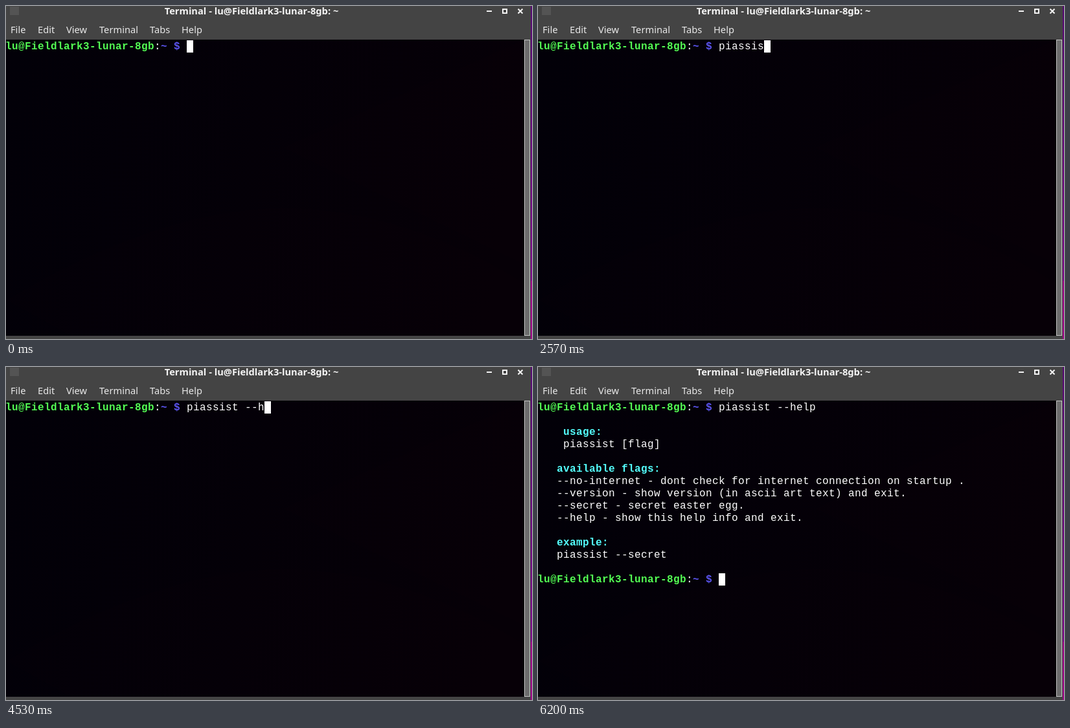
Animation, 812 px wide and 515 px high, one loop 8 s. Source, as an HTML page with a canvas:

```html
<!DOCTYPE html>
<html lang="en">
<head>
<meta charset="utf-8">
<title>Terminal</title>
<style>
html, body { margin: 0; width: 100%; height: 100%; overflow: hidden; background: #000; }
canvas { display: block; width: 812px; height: 515px; }
</style>
</head>
<body>
<canvas id="stage" width="812" height="515"></canvas>
<script>
const ctx = document.getElementById('stage').getContext('2d');
const W = 812, H = 515, LOOP = 8000;
const CELL_W = 10, CELL_H = 19, LEFT = -1, TOP = 53, ASCENT = 14;

const USER = 'lu@Fieldlark3-lunar-8gb';
const COMMAND = 'piassist --help';
const WHITE = '#ffffff', GREEN = '#54ff54', BLUE = '#5c54f0', CYAN = '#54ffff';
const UI = '14.667px "Noto Sans", sans-serif';
const MONO = '16px "Liberation Mono", monospace';

// [time, characters typed]
const TYPING = [[0, 0], [470, 1], [900, 2], [2570, 7], [2900, 8], [3730, 10],
                [4130, 11], [4530, 12], [4970, 13], [5370, 14], [5800, 15]];
const ENTER = 5800, OUTPUT = 6200;

const MENU = [['File', 7], ['Edit', 49], ['View', 93], ['Terminal', 144],
              ['Tabs', 222], ['Help', 271]];

// [row, column, text, heading]
const HELP = [
  [2, 4, 'usage:', true],
  [3, 4, 'piassist [flag]'],
  [5, 3, 'available flags:', true],
  [6, 3, '--no-internet - dont check for internet connection on startup .'],
  [7, 3, '--version - show version (in ascii art text) and exit.'],
  [8, 3, '--secret - secret easter egg.'],
  [9, 3, '--help - show this help info and exit.'],
  [11, 3, 'example:', true],
  [12, 3, 'piassist --secret'],
];

function rect(x, y, w, h, color) {
  ctx.fillStyle = color;
  ctx.fillRect(x, y, w, h);
}

function label(text, x, y, font, color) {
  ctx.font = font;
  ctx.fillStyle = color;
  ctx.fillText(text, x, y);
}

// Terminal text sits one character per cell
function print(row, col, text, color = WHITE, bold = false) {
  const font = (bold ? 'bold ' : '') + MONO;
  [...text].forEach((char, i) => {
    label(char, LEFT + (col + i) * CELL_W, TOP + row * CELL_H + ASCENT, font, color);
  });
}

function prompt(row) {
  const n = USER.length;
  print(row, 0, USER, GREEN, true);
  print(row, n, ':');
  print(row, n + 1, '~ $', BLUE, true);
  return n + 5;
}

function cursor(row, col) {
  rect(LEFT + col * CELL_W, TOP + row * CELL_H, CELL_W, CELL_H, WHITE);
}

function gradient(x0, y0, x1, y1, from, to) {
  const g = ctx.createLinearGradient(x0, y0, x1, y1);
  g.addColorStop(0, from);
  g.addColorStop(1, to);
  return g;
}

// Dark wallpaper faintly showing through the terminal
function backdrop() {
  rect(0, 52, 800, 458, gradient(0, 52, 800, 200, '#020008', '#060007'));
  ctx.fillStyle = 'rgba(50, 0, 10, 0.02)';
  ctx.beginPath();
  ctx.moveTo(800, 52);
  ctx.lineTo(427, 219);
  ctx.lineTo(800, 400);
  ctx.fill();
  ctx.beginPath();
  ctx.moveTo(0, 455);
  ctx.quadraticCurveTo(230, 316, 425, 312);
  ctx.quadraticCurveTo(610, 312, 800, 428);
  ctx.lineTo(800, 510);
  ctx.lineTo(100, 510);
  ctx.fill();
}

function chrome() {
  const grey = '#444444', light = '#f4f4f4';
  rect(0, 0, 810, 52, grey);
  rect(0, 510, 810, 5, grey);
  rect(809, 52, 1, 458, grey);
  rect(810, 0, 2, 425, gradient(0, 0, 0, 425, '#540a70', '#800a8c'));
  rect(810, 425, 2, 90, '#a00888');

  rect(800, 52, 9, 458, '#c4c4c4');
  rect(801, 53, 7, 456, '#6c6c6c');

  rect(6, 1, 14, 13, '#545454');
  rect(742, 7, 8, 2, light);
  ctx.strokeStyle = light;
  ctx.lineWidth = 2;
  ctx.strokeRect(767, 5, 6, 6);
  ctx.beginPath();
  ctx.moveTo(790.5, 4.5);
  ctx.lineTo(797.5, 11.5);
  ctx.moveTo(797.5, 4.5);
  ctx.lineTo(790.5, 11.5);
  ctx.stroke();

  ctx.textAlign = 'center';
  label(`Terminal - ${USER}: ~`, 379, 13, 'bold ' + UI, light);
  ctx.textAlign = 'left';
  for (const [name, x] of MENU) label(name, x, 42, UI, '#e8e8e8');
}

function draw(t) {
  ctx.clearRect(0, 0, W, H);
  backdrop();
  chrome();

  const typed = TYPING.filter(([at]) => t >= at).pop()[1];
  const start = prompt(0);
  print(0, start, COMMAND.slice(0, typed));

  if (t < ENTER) {
    cursor(0, start + typed);
  } else if (t < OUTPUT) {
    cursor(1, 0);
  } else {
    for (const [row, col, text, heading] of HELP) {
      print(row, col, text, heading ? CYAN : WHITE, heading);
    }
    cursor(14, prompt(14));
  }
}

const began = performance.now();
function tick() {
  draw((performance.now() - began) % LOOP);
  requestAnimationFrame(tick);
}
tick();
</script>
</body>
</html>
```
